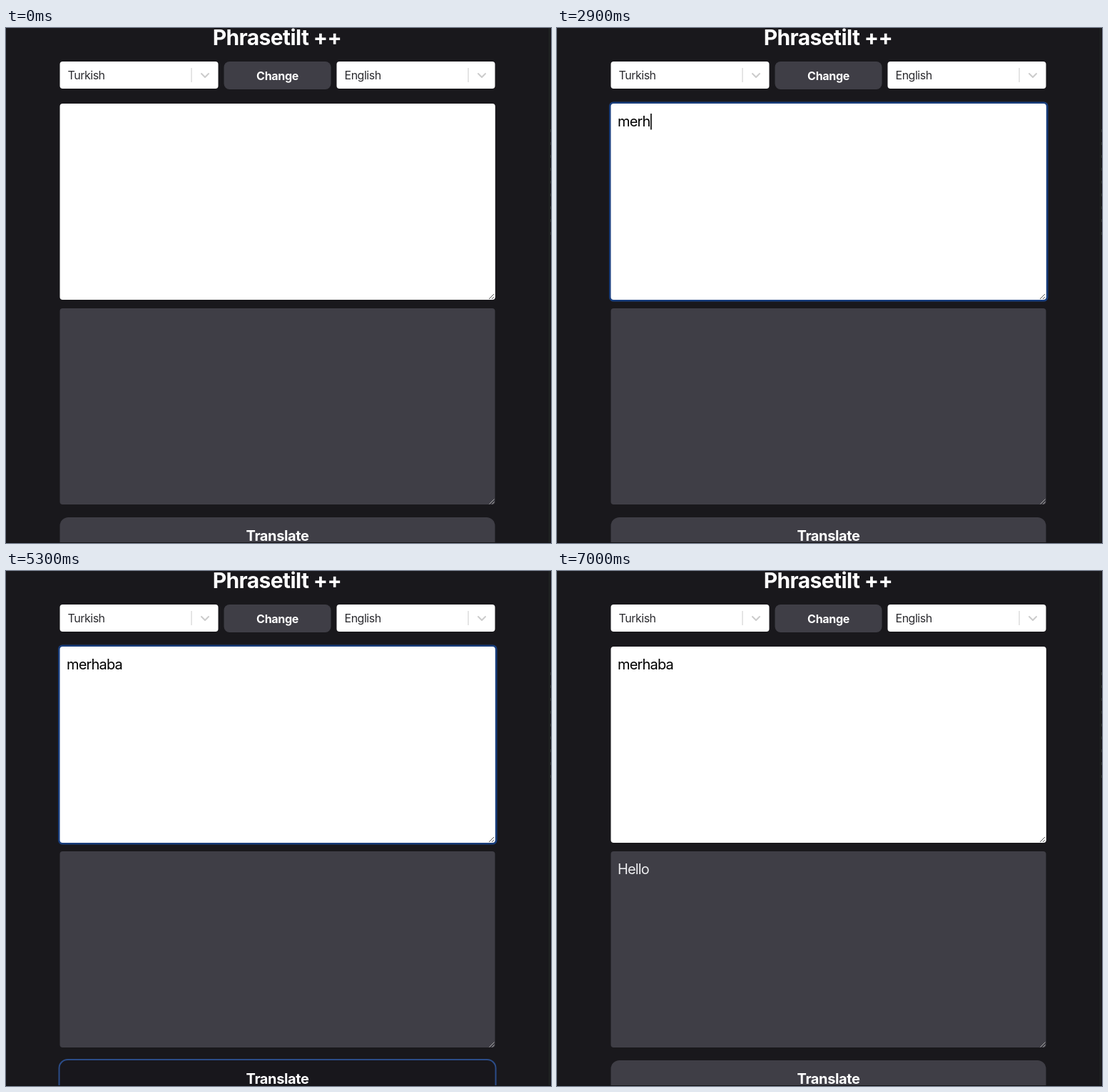
Write an HTML page that moves like this. It is 764 px wide and 722 px high and loops after 8000 ms.

```html
<!DOCTYPE html>
<html lang="en">
<head>
<meta charset="utf-8">
<title>Phrasetilt ++</title>
<style>
  html, body { margin: 0; width: 100%; height: 100%; overflow: hidden; background: #19181c; }
  svg { display: block; width: 100%; height: 100%; }
  text { font-family: Inter, Roboto, sans-serif; white-space: pre; }
  .bold { font-weight: 650; fill: #fff; text-anchor: middle; letter-spacing: -.02em; }
  .select { font-size: 16px; fill: #2b2b2f; letter-spacing: -.03em; }
  .area { font-size: 20px; letter-spacing: -.042em; }
  .panel { fill: #3f3e46; }
  .line { fill: none; stroke: #ccc; }
  .grip { fill: none; }
</style>
</head>
<body>
<svg viewBox="0 0 764 722">
  <defs>
    <g id="select">
      <rect width="222" height="38" rx="4" fill="#fff"/>
      <path class="line" d="M184.500 9v20"/>
      <path class="line" d="M198.500 17l5 5 5-5" stroke-width="2" stroke-linecap="round" stroke-linejoin="round"/>
    </g>
    <path id="grip" class="grip" d="M0 7l7-7M4 7l3-3"/>
  </defs>
  <rect width="764" height="722" fill="#19181c"/>
  <rect x="761" width="1" height="722" fill="#232825"/>
  <path d="M763.500 142V304" stroke="#303532" stroke-dasharray="4 14"/>

  <text class="bold" x="380" y="24" font-size="30">Phrasetilt ++</text>
  <use href="#select" x="75.500" y="47"/>
  <text class="select" x="86.500" y="72">Turkish</text>
  <rect class="panel" x="305.500" y="47" width="150" height="39" rx="8"/>
  <text class="bold" x="380.500" y="73" font-size="16">Change</text>
  <use href="#select" x="463.500" y="47"/>
  <text class="select" x="474.500" y="72">English</text>

  <rect id="ring" x="73" y="103.500" width="615.500" height="280" rx="6" fill="#183d7c"/>
  <rect x="75.500" y="106" width="610.300" height="275" rx="4" fill="#fff"/>
  <use href="#grip" x="677" y="373" stroke="#555"/>
  <text id="input" class="area" x="85" y="138"></text>
  <rect id="caret" y="120" width="1.600" height="22.500"/>

  <rect class="panel" x="75.500" y="393" width="610" height="275" rx="4"/>
  <use href="#grip" x="677.500" y="660.500" stroke="#aaa"/>
  <text id="output" class="area" x="85" y="425" fill="#ececef">Hello</text>

  <rect class="panel" x="75.500" y="686" width="610" height="60" rx="12"/>
  <rect id="pressed" x="74.500" y="685" width="612" height="62" rx="12" fill="#18171c" stroke="#2b4c88" stroke-width="2"/>
  <text class="bold" x="380.500" y="719" font-size="20">Translate</text>
  <rect y="721" width="764" height="1" fill="#121215"/>
</svg>
<script>
const LOOP = 8000, STEP = 100;
const WORD = 'merhaba';
const FOCUS = 1200, PRESS = 5300, BLUR = 5800, REPLY = 6500, RELEASE = 7000;
const FIRST_KEY = 2300, KEY_GAP = 180;
const BLINK = 1100, FADE = 200;

const [input, caret, ring, pressed, output] =
  ['input', 'caret', 'ring', 'pressed', 'output'].map(id => document.getElementById(id));

const clamp = v => Math.max(0, Math.min(1, v));
const fadeTo = (t, end) => clamp(1 - (end - t) / FADE);
const show = (node, opacity) => node.setAttribute('opacity', opacity);
const keyTime = i => Math.ceil((FIRST_KEY + i * KEY_GAP) / STEP) * STEP;

// The blink restarts on focus and on every key.
function caretOpacity(t, typed) {
  if (t < FOCUS - STEP || t >= BLUR) return 0;
  const restart = typed ? keyTime(typed - 1) : FOCUS;
  const phase = Math.max(0, t - restart) % BLINK;
  return clamp(Math.max((700 - phase) / 300, (phase - 800) / 300));
}

function draw(time) {
  const t = Math.floor(time / STEP) * STEP;
  let typed = 0;
  while (typed < WORD.length && t >= keyTime(typed)) typed++;

  const text = WORD.slice(0, typed);
  if (input.textContent !== text) input.textContent = text;
  const width = typed ? input.getComputedTextLength() : 0;
  caret.setAttribute('x', 85.6 + width);

  show(caret, caretOpacity(t, typed));
  show(ring, t < BLUR ? fadeTo(t, FOCUS) : 0);
  show(pressed, fadeTo(t, PRESS) - fadeTo(t, RELEASE));
  show(output, t >= REPLY ? 1 : 0);
}

const begin = performance.now();
function tick() {
  draw((performance.now() - begin) % LOOP);
  requestAnimationFrame(tick);
}
tick();
</script>
</body>
</html>
```
